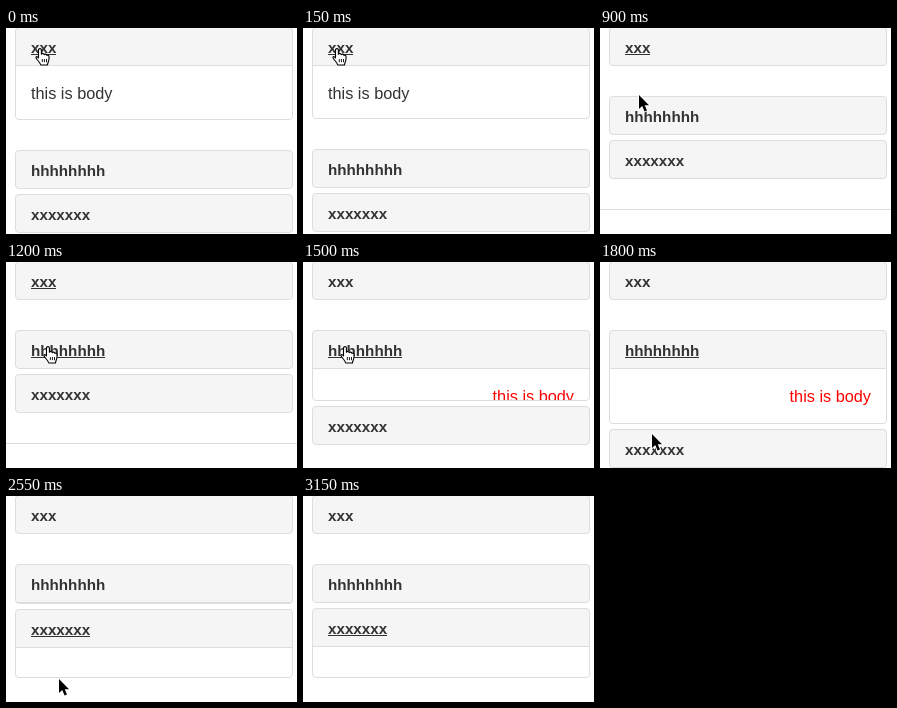
Recreate the animation shown at these times as an HTML page with a canvas. Size 291 by 206 pixels, loop 3.3 s.

```html
<!DOCTYPE html>
<html lang="en">
<head>
<meta charset="utf-8">
<title>Accordion</title>
<style>
  html, body { margin: 0; width: 100%; height: 100%; overflow: hidden; background: #fff; }
  canvas { display: block; }
</style>
</head>
<body>
<canvas id="stage" width="291" height="206"></canvas>
<script>
const ctx = document.getElementById('stage').getContext('2d');
const LOOP = 3300, STEP = 150;
const HEAD = 38, LEFT = 9, WIDTH = 278, PAD = 16;
const BORDER = '#ddd';

// Held keys: [time, body height]; hover: [from, to] of the title underline
const panels = [
  { title: 'xxx', body: 'this is body', color: '#333', gap: 31, hover: [0, 1350],
    keys: [[0, 54], [150, 53], [600, 19], [750, 1], [900, 0]] },
  { title: 'hhhhhhhh', body: 'this is body', color: '#f00', right: true, gap: 6, hover: [1200, 2250],
    keys: [[0, 0], [1500, 32], [1650, 53], [1800, 55], [2400, 14], [2550, 1], [2700, 0]] },
  { title: 'xxxxxxx', body: '', gap: 31, hover: [1950, LOOP],
    keys: [[0, 0], [2400, 24], [2550, 30], [2700, 31]] }
];

// Held keys: [time, x, y, shape]
const pointer = [
  [0, 29, 20, 'hand'], [600, 29, 21, 'hand'], [750, 39, 52, 'arrow'],
  [900, 39, 67, 'arrow'], [1050, 42, 76, 'arrow'], [1200, 37, 84, 'hand'],
  [1650, 45, 104, 'arrow'], [1800, 52, 172, 'arrow'], [1950, 49, 183, 'hand'],
  [2400, 53, 183, 'arrow'], [2850, 112, 189, 'arrow'], [3000, 235, 202, 'arrow'],
  [3150, 0, 0, '']
];

const arrowPath = new Path2D('M0 0V14L3.2 11 5.6 16.4 8 15.4 5.7 10.2H10Z');
const handPath = new Path2D(
  'M3.5 10V2C3.5 .2 6.4 .2 6.4 2V6.2C7 5 9 5.2 9.2 6.6C10 5.7 11.5 6 11.8 7.3' +
  'C13 6.7 14 7.4 14 8.6V11C14 13.2 12.7 14.2 12.5 17H5.8C5.4 14.8 2.8 12.8 1.2 10.2' +
  'C.3 8.7 1.9 7.8 3.5 10Z');
const fingerLines = new Path2D('M7.3 11V14.2M9.4 11V14.2M11.5 11V14.2');

function held(keys, t) {
  let last = keys[0];
  for (const key of keys) if (key[0] <= t) last = key;
  return last;
}

function drawPanel(panel, top, height, t) {
  const line = top + HEAD;
  ctx.save();
  ctx.beginPath();
  ctx.roundRect(LEFT + 0.5, top + 0.5, WIDTH - 1, HEAD + height, 3.5);
  const frame = new Path2D();
  frame.roundRect(LEFT + 0.5, top + 0.5, WIDTH - 1, HEAD + height, 3.5);
  ctx.clip();
  ctx.fillStyle = '#f5f5f5';
  ctx.fillRect(LEFT, top, WIDTH, HEAD);
  if (height > 0) {
    ctx.fillStyle = BORDER;
    ctx.fillRect(LEFT, line, WIDTH, 1);
    ctx.fillStyle = panel.color || '#333';
    ctx.font = '16.3px "Liberation Sans", Arial, sans-serif';
    ctx.textAlign = panel.right ? 'right' : 'left';
    const x = panel.right ? LEFT + WIDTH - PAD : LEFT + PAD;
    ctx.fillText(panel.body, x, line + 34);
  }
  ctx.restore();
  ctx.strokeStyle = BORDER;
  ctx.lineWidth = 1;
  ctx.stroke(frame);

  ctx.fillStyle = '#333';
  ctx.font = 'bold 15.2px "Liberation Sans", Arial, sans-serif';
  ctx.textAlign = 'left';
  ctx.fillText(panel.title, LEFT + PAD, top + 26);
  if (t >= panel.hover[0] && t < panel.hover[1]) {
    ctx.fillRect(LEFT + PAD, top + 27, Math.round(ctx.measureText(panel.title).width), 1);
  }
}

function drawPointer(t) {
  const [, x, y, shape] = held(pointer, t);
  if (!shape) return;
  ctx.save();
  ctx.translate(x, y);
  ctx.lineJoin = 'round';
  if (shape === 'arrow') {
    ctx.strokeStyle = '#fff';
    ctx.lineWidth = 2;
    ctx.stroke(arrowPath);
    ctx.fillStyle = '#000';
    ctx.fill(arrowPath);
  } else {
    ctx.fillStyle = '#fff';
    ctx.fill(handPath);
    ctx.strokeStyle = '#000';
    ctx.lineWidth = 1.1;
    ctx.stroke(handPath);
    ctx.lineWidth = 0.9;
    ctx.stroke(fingerLines);
  }
  ctx.restore();
}

function draw(now) {
  const t = Math.floor((now % LOOP) / STEP) * STEP;
  ctx.fillStyle = '#fff';
  ctx.fillRect(0, 0, 291, 206);
  let top = -1;
  for (const panel of panels) {
    const height = held(panel.keys, t)[1];
    drawPanel(panel, top, height, t);
    top += HEAD + height + panel.gap;
  }
  // Lower edge of the enclosing box
  ctx.fillStyle = BORDER;
  ctx.fillRect(0, top, 291, 1);
  drawPointer(t);
}

const start = performance.now();
function tick() {
  draw(performance.now() - start);
  requestAnimationFrame(tick);
}
tick();
</script>
</body>
</html>
```
